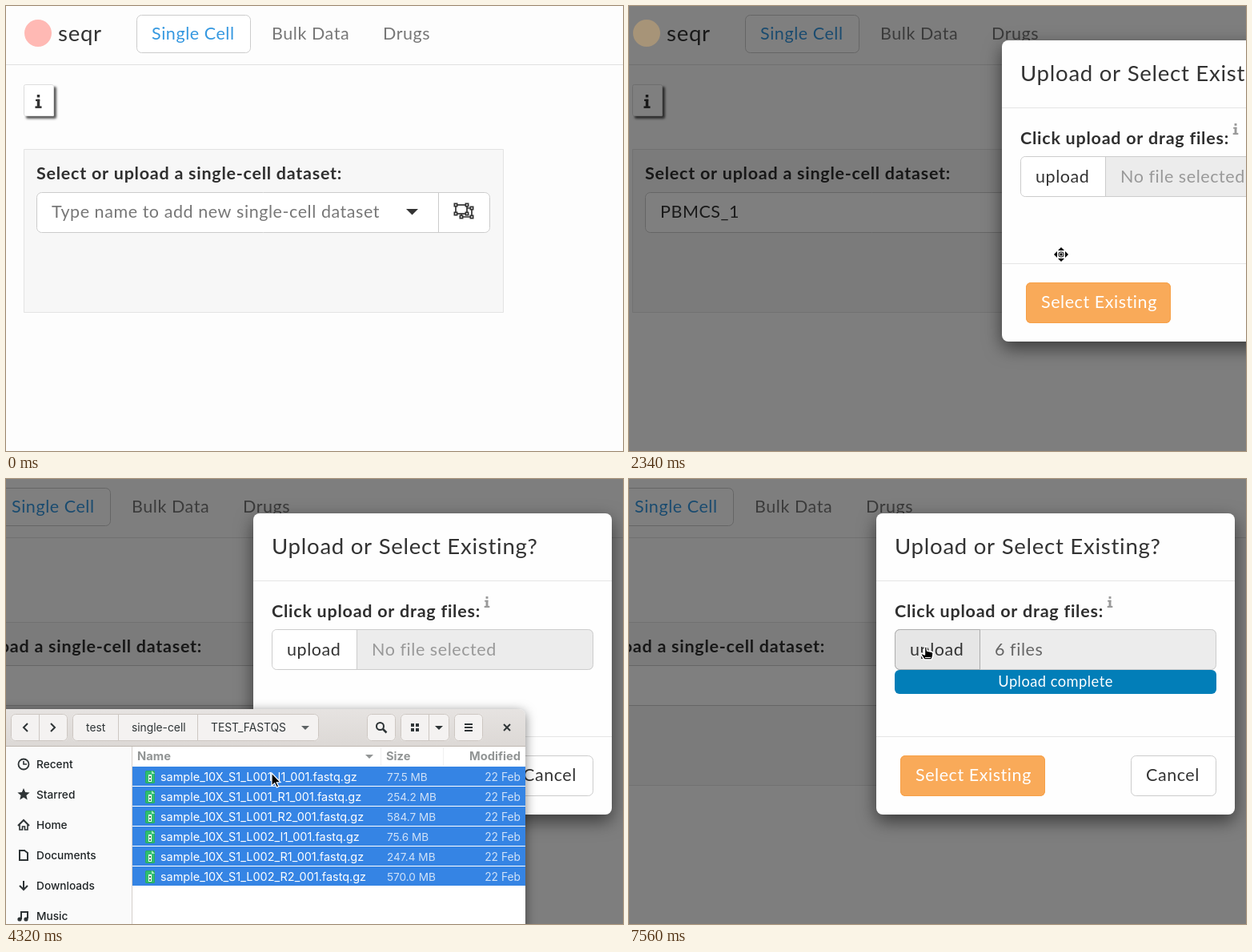
An HTML page with a canvas for the animation above (8000 ms loop, 771 by 557 pixels).

```html
<!DOCTYPE html>
<html lang="en">
<head>
<meta charset="utf-8">
<title>Dataset upload</title>
<style>
html, body { margin: 0; width: 100%; height: 100%; overflow: hidden; background: #fdfdfd; }
canvas { display: block; width: 771px; height: 557px; }
</style>
</head>
<body>
<canvas id="stage" width="771" height="557"></canvas>
<script>
const ctx = document.getElementById('stage').getContext('2d');
const W = 771, H = 557, LOOP = 8000, TICK = 90;
const WEB = { family: 'Lato, sans-serif', size: 21.5, weight: 400, color: '#333', track: 0.026 };
const BOLD = { ...WEB, weight: 700, color: '#2f2f2f', track: 0.035 };
const TITLE = { ...WEB, size: 27.6 };
const DESK = { family: 'Inter, sans-serif', size: 13.8, weight: 400, color: '#2e3436', track: 0 };
const HEAD = { ...DESK, size: 14.7, weight: 700, color: '#929595' };
const INK = '#2e3436';

const clamp = v => Math.max(0, Math.min(1, v));
const easeInOut = v => v * v * (3 - 2 * v);
const easeOut = v => 1 - (1 - v) ** 2;

function text(s, x, y, style, extra = {}) {
  const o = { ...style, ...extra };
  ctx.font = `${o.weight} ${o.size}px ${o.family}`;
  ctx.letterSpacing = `${o.track * o.size}px`;
  ctx.textAlign = o.align || 'left';
  ctx.fillStyle = o.color;
  ctx.fillText(s, x, y);
}

function rect(x, y, w, h, color) {
  ctx.fillStyle = color;
  ctx.fillRect(x, y, w, h);
}

function solid(x, y, w, h, radius, fill) {
  ctx.beginPath();
  ctx.roundRect(x, y, w, h, radius);
  ctx.fillStyle = fill;
  ctx.fill();
}

function box(x, y, w, h, radius, fill, stroke) {
  if (fill) solid(x, y, w, h, radius, fill);
  ctx.beginPath();
  ctx.roundRect(x + 0.5, y + 0.5, w - 1, h - 1, radius);
  ctx.strokeStyle = stroke;
  ctx.lineWidth = 1;
  ctx.stroke();
}

function trace(points, closed) {
  ctx.beginPath();
  points.forEach(([x, y], i) => i ? ctx.lineTo(x, y) : ctx.moveTo(x, y));
  if (closed) ctx.closePath();
}

function poly(points, color) {
  trace(points, true);
  ctx.fillStyle = color;
  ctx.fill();
}

function line(points, color = INK, width = 2) {
  trace(points);
  ctx.strokeStyle = color;
  ctx.lineWidth = width;
  ctx.stroke();
}

function ring(x, y, r, width) {
  ctx.beginPath();
  ctx.arc(x, y, r, 0, 7);
  ctx.strokeStyle = INK;
  ctx.lineWidth = width;
  ctx.stroke();
}

function withShadow(color, blur, dx, dy, draw) {
  ctx.save();
  ctx.shadowColor = color;
  ctx.shadowBlur = blur;
  ctx.shadowOffsetX = dx;
  ctx.shadowOffsetY = dy;
  draw();
  ctx.restore();
}

function infoMark(cx, top, unit, color) {
  const bar = (x, y, w, h) => rect(cx + x * unit, top + y * unit, w * unit, h * unit, color);
  bar(-1.5, 0, 3, 3);
  bar(-3, 5, 4.5, 2);
  bar(-1.5, 5, 3, 9);
  bar(-3.5, 12.5, 7, 2.2);
}

function groupIcon(x, y) {
  ctx.strokeStyle = '#333';
  ctx.lineWidth = 1.7;
  ctx.strokeRect(x + 2, y + 2, 14, 11);
  line([[x + 16, y + 6], [x + 22, y + 6], [x + 22, y + 17], [x + 9, y + 17], [x + 9, y + 13]], '#333', 1.7);
  for (const [dx, dy] of [[2, 2], [16, 2], [2, 13], [16, 13], [22, 6], [22, 17], [9, 17]]) {
    rect(x + dx - 2.5, y + dy - 2.5, 5, 5, '#333');
    rect(x + dx - 0.8, y + dy - 0.8, 1.6, 1.6, '#fff');
  }
}

function drawPage(t, scroll) {
  rect(0, 0, W, H, '#fdfdfd');
  ctx.save();
  ctx.translate(-scroll, 0);
  rect(0, 73, W + 200, 1, '#e1e1e1');
  text('seqr', 65, 44, TITLE);
  box(163, 11, 143, 48, 6, '#fff', '#ccc');
  text('Single Cell', 182, 42, WEB, { color: '#3598e0' });
  text('Bulk Data', 332, 42, WEB, { color: '#777' });
  text('Drugs', 471, 42, WEB, { color: '#777' });

  withShadow('rgba(0,0,0,.65)', 3, 3, 3, () => solid(22, 98, 38, 40, 2, '#fff'));
  box(22, 98, 38, 40, 2, '#fff', '#ddd');
  infoMark(40.5, 111, 1.15, '#333');

  box(22, 179, 600, 205, 0, '#f7f7f7', '#e3e3e3');
  text('Select or upload a single-cell dataset:', 38, 217, BOLD);
  box(38, 233, 567, 51, 6, '#fff', '#ccc');
  rect(540, 234, 1, 49, '#ccc');
  poly([[500, 254], [515, 254], [507.5, 261.5]], '#333');
  groupIcon(560, 247);

  const typed = 'PBMCS_1'.slice(0, Math.floor(t / TICK));
  if (typed) text(typed, 57, 265, WEB);
  else text('Type name to add new single-cell dataset', 57, 265, WEB, { color: '#777' });
  if (typed && t < 1260) {
    withShadow('rgba(0,0,0,.12)', 8, 0, 4, () => box(38, 284, 503, 60, 4, '#fff', '#ccc'));
    rect(39, 292, 501, 44, '#f5f5f5');
    text('Add ', 57, 321, WEB);
    text(typed + '…', 101, 321, BOLD);
  }
  ctx.restore();
}

function drawLogo(t, scroll) {
  ctx.beginPath();
  ctx.arc(40 - scroll, 34, 17, 0, 7);
  ctx.fillStyle = t < TICK ? '#ffb9b4' : t < 1260 ? '#f5d3b4' : '#a79478';
  ctx.fill();
}

function drawFileInput(x, t) {
  const done = t >= 6120, hover = t >= 7560;
  const glow = t < 5040 || done ? 0 : t < 5760 ? 0.6 : 0.85;
  if (glow) withShadow(`rgba(76,174,76,${glow})`, 12, 0, 0, () => solid(x + 23, 188, 402, 51, 6, '#eee'));
  box(x + 23, 188, 402, 51, 6, '#ececec', '#ccc');
  solid(x + 24, 189, 105, 49, [5, 0, 0, 5], hover ? '#e6e6e6' : '#fff');
  rect(x + 129, 189, 1, 49, '#ccc');
  if (hover) box(x + 23, 188, 107, 51, [6, 0, 0, 6], null, '#adadad');
  text('upload', x + 42, 221, WEB);
  text(done ? '6 files' : 'No file selected', x + 148, 221, WEB, { color: done ? '#666' : '#999' });
  if (!done) return;

  const part = easeOut(clamp((t - 6120 + TICK) / 540));
  solid(x + 23, 239, 402, 30, 6, '#f5f5f5');
  ctx.save();
  ctx.beginPath();
  ctx.rect(x + 23, 239, 402 * part, 30);
  ctx.clip();
  solid(x + 23, 239, 402, 30, 6, '#027eb8');
  text('Upload complete', x + 23 + 201 * part, 260, WEB, { size: 18.3, color: '#fff', align: 'center' });
  ctx.restore();
}

function drawModal(t, scroll) {
  const shown = t < 1350 ? 0.5 : 1;
  const x = 484 - scroll;
  rect(0, 0, W, H, `rgba(0,0,0,${0.5 * shown})`);
  drawLogo(t, scroll);
  ctx.save();
  ctx.globalAlpha = shown;
  ctx.translate(0, -40 * (1 - shown));
  withShadow('rgba(0,0,0,.55)', 22, 0, 8, () => solid(x, 43, 448, 377, 8, '#fefefe'));
  rect(x, 127, 448, 1, '#e5e5e5');
  rect(x, 322, 448, 1, '#e5e5e5');
  text('Upload or Select Existing?', x + 23, 94, TITLE);
  text('Click upload or drag files:', x + 23, 173, BOLD);
  infoMark(x + 292, 147, 0.95, '#999');
  drawFileInput(x, t);
  box(x + 30, 346, 181, 51, 6, '#f9aa59', '#f7a047');
  text('Select Existing', x + 49, 378, WEB, { color: '#fff' });
  box(x + 318, 346, 107, 51, 6, '#fff', '#ccc');
  text('Cancel', x + 337, 378, WEB);
  ctx.restore();
}

function drawToolbar() {
  const button = (x, w, ...splits) => {
    box(x, 294, w, 34, 5, '#f4f2f1', '#cdc7c2');
    splits.forEach(s => rect(s, 295, 1, 32, '#cdc7c2'));
  };
  button(6, 71, 41);
  line([[27, 306], [22, 311], [27, 316]]);
  line([[56, 306], [61, 311], [56, 316]]);
  button(83, 308, 140, 239);
  text('test', 100, 316, DESK);
  text('single-cell', 157, 316, DESK);
  text('TEST_FASTQS', 256, 316, DESK);
  poly([[369, 309], [379, 309], [374, 314]], '#5d6264');
  button(451, 36);
  ring(467.5, 309.5, 4.5, 2);
  line([[471, 313], [475.5, 317.5]], INK, 2.5);
  button(493, 61, 528);
  for (const dx of [0, 6]) for (const dy of [0, 6]) rect(506 + dx, 306 + dy, 4, 4, INK);
  poly([[536, 309], [546, 309], [541, 314]], INK);
  button(560, 36);
  for (const y of [306, 310, 314]) rect(573, y, 10, 2, INK);
  line([[622, 307], [630, 315]]);
  line([[630, 307], [622, 315]]);
}

const places = {
  Recent(x, y) {
    ring(x, y, 6.5, 1.8);
    line([[x, y - 4], [x, y], [x + 4, y]], INK, 1.6);
  },
  Starred(x, y) {
    poly(Array.from({ length: 10 }, (_, i) => {
      const r = i % 2 ? 3.6 : 8, a = i * Math.PI / 5;
      return [x + r * Math.sin(a), y - r * Math.cos(a)];
    }), INK);
  },
  Home(x, y) {
    line([[x - 7, y + 1], [x, y - 6], [x + 7, y + 1]]);
    line([[x - 5, y], [x - 5, y + 6], [x - 1.5, y + 6], [x - 1.5, y + 2], [x + 1.5, y + 2],
      [x + 1.5, y + 6], [x + 5, y + 6], [x + 5, y]], INK, 1.6);
  },
  Documents(x, y) {
    line([[x + 2, y - 6], [x - 5, y - 6], [x - 5, y + 6], [x + 5, y + 6], [x + 5, y - 3], [x + 1, y - 6]]);
  },
  Downloads(x, y) {
    line([[x, y - 6], [x, y + 5]]);
    line([[x - 5, y], [x, y + 5], [x + 5, y]]);
  },
  Music(x, y) {
    line([[x - 3, y + 4], [x - 3, y - 5], [x + 5, y - 5], [x + 5, y + 3]]);
    ring(x - 5, y + 4, 1.3, 2.6);
    ring(x + 3, y + 4, 1.3, 2.6);
  }
};

const sizes = ['77.5', '254.2', '584.7', '75.6', '247.4', '570.0'];
const parts = ['I1', 'R1', 'R2'];

function drawRow(i, selected) {
  const y = 373 + 25 * i;
  if (selected) rect(158, y - 13, 491, 24, '#3584e4');
  box(174, y - 8, 12, 16, 1.5, '#2fbf71', '#27a863');
  poly([[182, y - 8], [186, y - 4], [182, y - 4]], '#a9e8c4');
  rect(178, y - 3, 4, 9, '#eefaf3');
  rect(179, y - 1, 2, 2, '#39795a');
  rect(179, y + 3, 2, 2, '#39795a');
  const name = `sample_10X_S1_L00${i < 3 ? 1 : 2}_${parts[i % 3]}_001.fastq.gz`;
  const faint = { color: selected ? '#d0e2f8' : '#929595' };
  text(name, 193, y + 5, DESK, { size: 14.45, color: selected ? '#fff' : '#000' });
  text(sizes[i] + ' MB', 476, y + 5, DESK, { ...faint, size: 13.6 });
  text('22 Feb', 643, y + 5, DESK, { ...faint, align: 'right' });
}

function drawFileWindow(t) {
  const shown = t < 3150 ? 0.35 : t < 3240 ? 0.8 : 1;
  const scale = 0.9 + 0.1 * shown;
  ctx.save();
  ctx.globalAlpha = shown;
  ctx.translate(300, 480);
  ctx.scale(scale, scale);
  ctx.translate(-300, -480);
  withShadow('rgba(0,0,0,.5)', 14, 0, 3, () => solid(-20, 288, 669, 320, 8, '#fff'));
  const header = ctx.createLinearGradient(0, 288, 0, 335);
  header.addColorStop(0, '#e6e3e1');
  header.addColorStop(1, '#dcd8d5');
  solid(-20, 288, 669, 47, [8, 8, 0, 0], header);
  rect(-20, 334, 669, 1, '#bfb8b1');
  drawToolbar();

  rect(-20, 335, 177, 270, '#fafafa');
  rect(157, 335, 1, 270, '#d5d0cc');
  Object.entries(places).forEach(([name, icon], i) => {
    const y = 357 + 38 * i;
    icon(22, y);
    text(name, 38, y + 5, DESK, { weight: 500, size: 13.7, color: '#1f2426' });
  });

  text('Name', 164, 352, HEAD);
  poly([[449, 345], [459, 345], [454, 350]], '#929595');
  text('Size', 475, 352, HEAD);
  text('Modified', 643, 352, HEAD, { align: 'right' });
  rect(468, 336, 1, 23, '#f1f1f1');
  rect(546, 336, 1, 23, '#f1f1f1');
  const picked = t < 3510 ? 0 : t < 3870 ? 1 : 6;
  sizes.forEach((_, i) => drawRow(i, i < picked));
  ctx.restore();
}

const cursors = {
  arrow() {
    trace([[0, 0], [0, 16], [3.7, 12.7], [6.3, 18], [8.8, 17], [6.2, 11.8], [11, 11.5]], true);
    ctx.fillStyle = '#000'; ctx.strokeStyle = '#fff'; ctx.lineWidth = 1.2;
    ctx.fill(); ctx.stroke();
  },
  hand() {
    trace([[-1.5, 0], [1, 0], [1.5, 5], [8, 6.5], [9, 8], [8.5, 12], [7, 16], [-2, 16], [-6, 10], [-5.5, 8], [-1.5, 10]], true);
    ctx.fillStyle = '#000'; ctx.strokeStyle = '#fff'; ctx.lineWidth = 1.4;
    ctx.lineJoin = 'round';
    ctx.fill(); ctx.stroke();
    rect(-1, 13, 7, 1, '#fff');
  },
  pan() {
    poly([[0, -10], [10, 0], [0, 10], [-10, 0]], '#fff');
    for (let i = 0; i < 4; i++) {
      poly([[0, -9], [4, -5], [-4, -5]], '#000');
      ctx.rotate(Math.PI / 2);
    }
    box(-3.5, -3.5, 7, 7, 2, '#fff', '#000');
    rect(-1.5, -1.5, 3, 3, '#000');
  }
};

// [start, x, y, shape]: each pose holds until the next
const pointer = [
  [90, 296, 346, 'arrow'], [180, 287, 328, 'arrow'], [270, 281, 316, 'arrow'],
  [1530, 410, 318, 'arrow'], [1890, 540, 311, 'arrow'], [2340, 540, 311, 'pan'],
  [2790, 540, 311, 'arrow'], [3240, 440, 350, 'arrow'], [3510, 378, 375, 'arrow'],
  [3870, 350, 497, 'arrow'], [4320, 332, 368, 'arrow'], [4680, 345, 320, 'hand'],
  [5040, 380, 225, 'hand'], [7560, 371, 210, 'hand']
];

function drawPointer(t) {
  const pose = pointer.findLast(p => p[0] <= t);
  if (!pose) return;
  ctx.save();
  ctx.translate(pose[1], pose[2]);
  cursors[pose[3]]();
  ctx.restore();
}

function draw(now) {
  const t = Math.floor(now % LOOP / TICK) * TICK;
  const scroll = Math.round(175 * easeInOut(clamp((t - 2250) / 450)));
  drawPage(t, scroll);
  if (t < 1260) drawLogo(t, scroll);
  else drawModal(t, scroll);
  if (t >= 3060 && t < 5670) drawFileWindow(t);
  drawPointer(t);
}

const start = performance.now();
function tick() {
  draw(performance.now() - start);
  requestAnimationFrame(tick);
}
tick();
</script>
</body>
</html>
```
